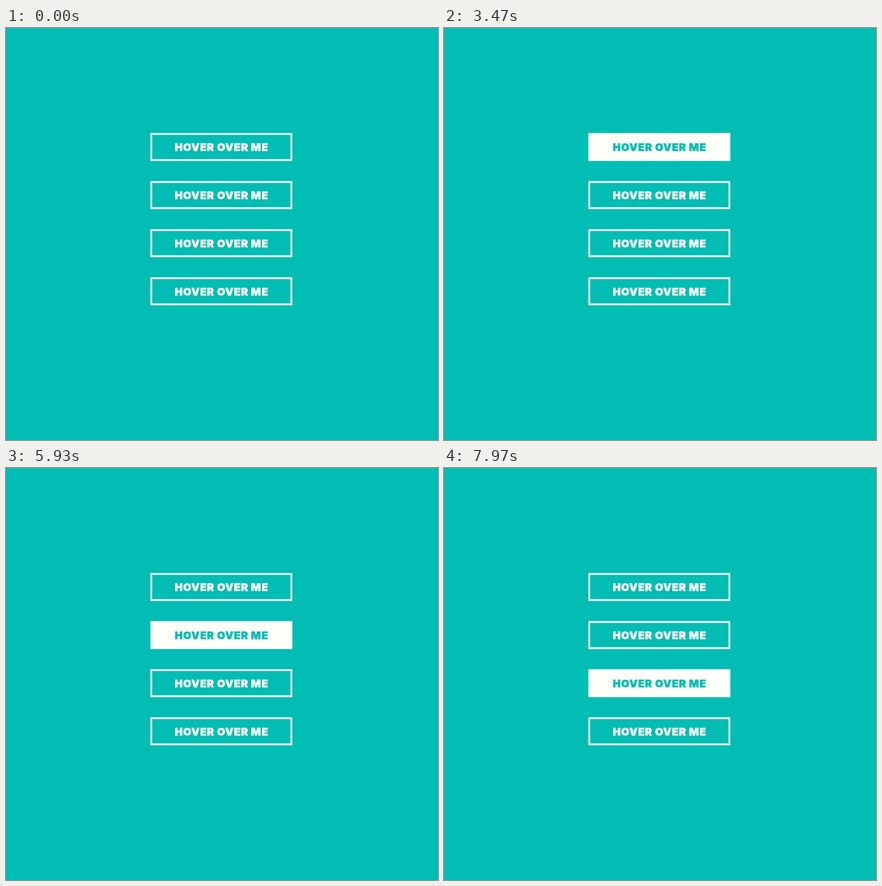
Write an HTML page with a canvas that moves like this. It is 682 by 650 pixels and loops after 8 s.

```html
<!DOCTYPE html>
<html lang="en">
<head>
<meta charset="utf-8">
<title>Button hover effects</title>
<style>
  html, body { margin: 0; width: 100%; height: 100%; overflow: hidden; background: #02bdb3; }
  canvas { display: block; }
</style>
</head>
<body>
<canvas id="stage" width="682" height="650"></canvas>
<script>
const ctx = document.getElementById('stage').getContext('2d');
const LOOP = 8000, FADE = 500;
const LEFT = 228, TOP = 165.7, WIDTH = 224, HEIGHT = 44, GAP = 75.9, BORDER = 2.8;
const TEAL = [2, 189, 179], WHITE = [255, 255, 250];

// Hover start and end in ms, and the side the fill grows from.
const buttons = [
  { enter: 2030, leave: 3530, from: 'top' },
  { enter: 4630, leave: 6130, from: 'left' },
  { enter: 7260, leave: Infinity, from: 'right' },
  { enter: Infinity, leave: Infinity, from: 'left' }
];

const clamp = v => Math.max(0, Math.min(1, v));

// Cubic Bézier easing with control points (x1, y1) and (x2, y2).
function bezier(x1, y1, x2, y2) {
  const curve = (a, b, s) => 3 * a * s * (1 - s) ** 2 + 3 * b * s * s * (1 - s) + s ** 3;
  return x => {
    let low = 0, high = 1;
    for (let i = 0; i < 20; i++) {
      const mid = (low + high) / 2;
      if (curve(x1, x2, mid) < x) low = mid; else high = mid;
    }
    return curve(y1, y2, (low + high) / 2);
  };
}
const ease = bezier(.25, .1, .25, 1);
const easeInOut = bezier(.42, 0, .58, 1);

function hoverAmount(button, time, easing) {
  const into = clamp((time - button.enter) / FADE);
  const out = clamp((time - button.leave) / FADE);
  return easing(into) - easing(out);
}

function mix(a, b, amount) {
  return `rgb(${a.map((v, i) => Math.round(v + (b[i] - v) * amount))})`;
}

function drawButton(button, index, time) {
  const y = TOP + index * GAP;
  const innerW = WIDTH - 2 * BORDER, innerH = HEIGHT - 2 * BORDER;
  const fill = hoverAmount(button, time, ease);
  const w = button.from === 'top' ? innerW : innerW * fill;
  const h = button.from === 'top' ? innerH * fill : innerH;
  const x = LEFT + BORDER + (button.from === 'right' ? innerW - w : 0);

  // The fill reaches slightly under the border so that no seam shows.
  ctx.strokeStyle = ctx.fillStyle = mix(WHITE, TEAL, 0);
  ctx.lineWidth = BORDER;
  ctx.strokeRect(LEFT + BORDER / 2, y + BORDER / 2, WIDTH - BORDER, HEIGHT - BORDER);
  if (fill > 0) ctx.fillRect(x - 1, y + BORDER - 1, w + 2, h + 2);

  ctx.strokeStyle = ctx.fillStyle = mix(WHITE, TEAL, hoverAmount(button, time, easeInOut));
  ctx.lineWidth = .5;
  const textX = LEFT + WIDTH / 2 + .4, textY = y + 28.6;
  ctx.fillText('HOVER OVER ME', textX, textY);
  ctx.strokeText('HOVER OVER ME', textX, textY);
}

function draw(now) {
  const time = now % LOOP;
  ctx.clearRect(0, 0, 682, 650);
  ctx.font = '900 16.5px Inter, sans-serif';
  ctx.letterSpacing = '0.8px';
  ctx.textAlign = 'center';
  ctx.lineJoin = 'miter';
  buttons.forEach((button, index) => drawButton(button, index, time));
  requestAnimationFrame(draw);
}
draw(0);
</script>
</body>
</html>
```
